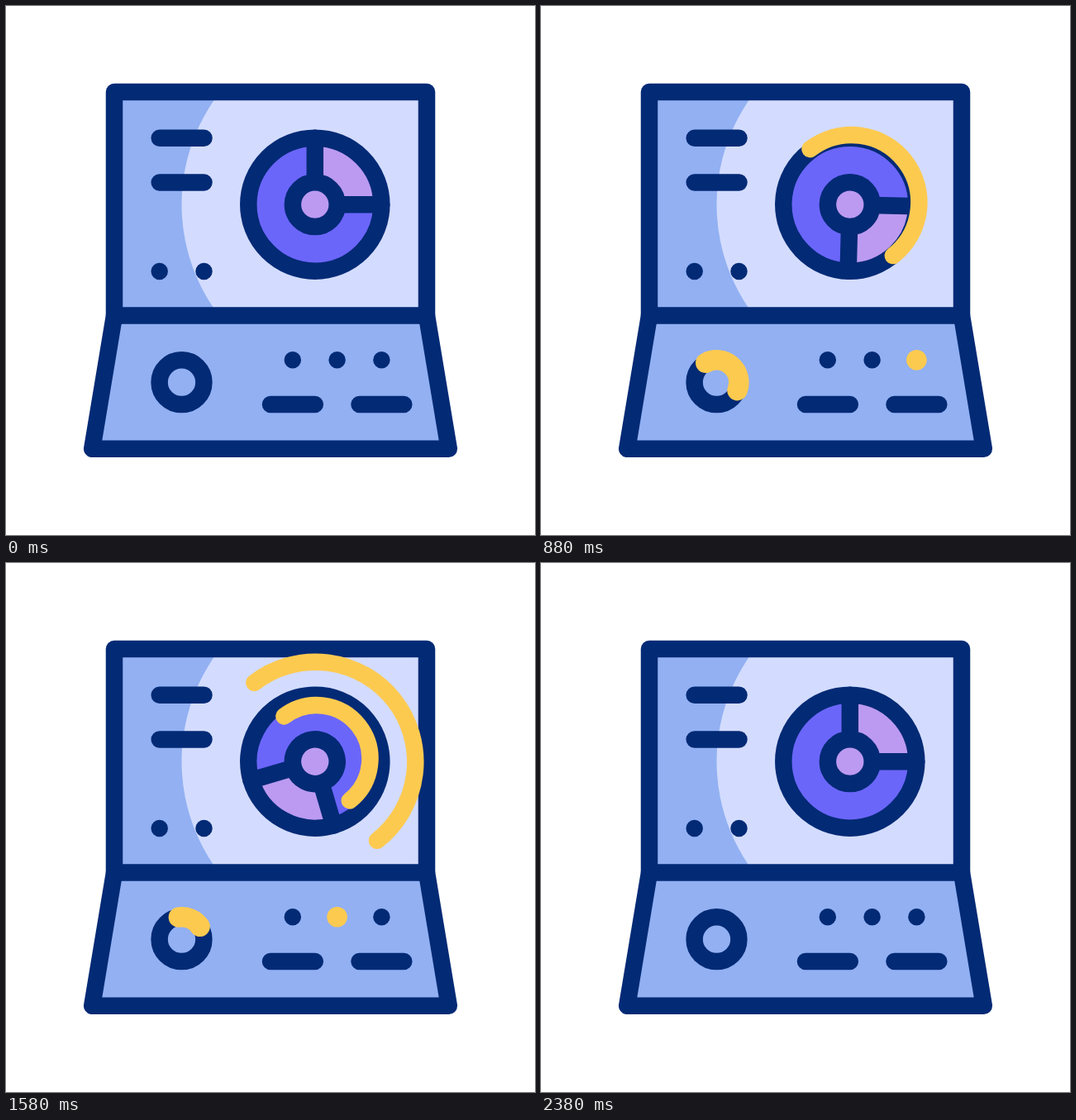
Animation, 640 px wide and 640 px high, one loop 2.4 s. Source, as an HTML page:

```html
<!DOCTYPE html>
<html lang="en">
<head>
<meta charset="utf-8">
<title>Scanner console</title>
<style>
  html, body { margin: 0; width: 100%; height: 100%; overflow: hidden; background: #fff; }
  svg { display: block; width: 100%; height: 100%; }
  .ink { stroke: #032a75; stroke-width: 20.5; stroke-linecap: round; stroke-linejoin: round; fill: none; }
  .glow { stroke: #fdca50; stroke-linecap: round; fill: none; }
</style>
</head>
<body>
<svg viewBox="0 0 640 640">
  <defs>
    <clipPath id="screen"><rect x="131" y="104" width="378" height="270.6"/></clipPath>
  </defs>

  <rect x="131" y="104" width="378" height="270.6" fill="#92b0f2"/>
  <circle cx="435.3" cy="240" r="222.8" fill="#d3dcfe" clip-path="url(#screen)"/>
  <path d="M131 374.6H509L535.8 535.8H104.2Z" fill="#92b0f2"/>

  <g class="ink">
    <rect x="131" y="104" width="378" height="270.6"/>
    <path d="M131 374.6L104.2 535.8H535.8L509 374.6"/>
    <path d="M185.7 159.7h53.8M185.7 213.4h53.8M185.7 320.9h0M239.5 320.9h0"/>
    <path d="M346.8 428.3h0M400.6 428.3h0M454.4 428.3h0M320 482.1h53.8M427.5 482.1h53.8"/>
    <circle cx="212.5" cy="455.2" r="26.9"/>
  </g>

  <g id="wheel">
    <circle r="80.5" fill="#6b66fa"/>
    <path d="M0 0V-80.5A80.5 80.5 0 0 1 80.5 0Z" fill="#bc9af1"/>
    <g class="ink">
      <path d="M0 -80.5V-26.9M26.9 0H80.5"/>
      <circle r="80.5"/>
      <circle r="26.9" style="fill:#bc9af1"/>
    </g>
  </g>

  <path id="knob" class="glow" stroke-width="24.5"/>
  <g id="lamps" fill="#fdca50">
    <circle cx="346.8" cy="428.3"/>
    <circle cx="400.6" cy="428.3"/>
    <circle cx="454.4" cy="428.3"/>
  </g>
  <g id="pulses" class="glow" stroke-width="20.5"><path/><path/><path/></g>
</svg>

<script>
const LOOP = 2400;
const wheel = document.getElementById('wheel');
const knob = document.getElementById('knob');
const lamps = [...document.getElementById('lamps').children];
const waves = [...document.getElementById('pulses').children];

// [time, degrees clockwise]
const TURN = [[0, 0], [500, 125.4], [880, 91.6], [1160, 76.6], [1200, 76.6],
  [1580, 163.6], [1800, 178], [2040, 159.3], [2360, 0]];
const HEAD = [[0, 90], [500, 255], [880, 471], [1180, 636.5], [1580, 775], [1800, 810]];
const TAIL = [[120, 90], [500, 159], [880, 330], [1180, 500], [1580, 712], [2020, 810]];

// [start, duration]
const WAVES = [[490, 845], [983, 797], [1295, 833]];

const clamp = x => Math.max(0, Math.min(1, x));

// Smooth curve through keys that never overshoots them
function track(keys, t) {
  const last = keys.length - 1;
  if (t <= keys[0][0]) return keys[0][1];
  if (t >= keys[last][0]) return keys[last][1];
  const rate = i => (keys[i + 1][1] - keys[i][1]) / (keys[i + 1][0] - keys[i][0]);
  const slope = i => {
    if (i === 0 || i === last) return 0;
    const a = rate(i - 1), b = rate(i);
    return a * b <= 0 ? 0 : 2 * a * b / (a + b);
  };
  let i = 0;
  while (t >= keys[i + 1][0]) i++;
  const [t0, a] = keys[i], [t1, b] = keys[i + 1];
  const d = t1 - t0, u = (t - t0) / d, v = 1 - u;
  return a * v * v * (1 + 2 * u) + b * u * u * (3 - 2 * u)
    + d * u * v * (slope(i) * v - slope(i + 1) * u);
}

// Clockwise arc, angles measured from twelve o'clock
function arc(x, y, r, from, to) {
  const point = deg => {
    const a = deg * Math.PI / 180;
    return (x + r * Math.sin(a)).toFixed(2) + ' ' + (y - r * Math.cos(a)).toFixed(2);
  };
  return `M${point(from)}A${r} ${r} 0 ${to - from > 180 ? 1 : 0} 1 ${point(to)}`;
}

function drawWave(el, [start, span], t) {
  const u = (t - start) / span;
  const on = u > 0 && u < 1;
  el.style.display = on ? '' : 'none';
  if (!on) return;
  const r = 13 + 140 * (1.112 * u - 0.112 * u * u);
  el.setAttribute('d', arc(377.7 - 0.025 * r, 232 + 0.069 * r, r, -37.9, 142.1));
  el.setAttribute('opacity', clamp((t - start) / 100) * clamp((1 - u) / 0.14));
}

function drawLamp(el, i, t) {
  const first = 500 + 190 * i;
  const gap = Math.min(Math.abs(t - first), Math.abs(t - first - 890));
  const lit = clamp((115 - gap) / 45);
  el.setAttribute('r', 10.2 + 2.1 * lit);
  el.setAttribute('opacity', lit);
}

function render(t) {
  wheel.setAttribute('transform', `translate(373.8 240.2) rotate(${track(TURN, t)})`);

  const head = track(HEAD, t), tail = track(TAIL, t);
  knob.style.display = head - tail > 0.5 ? '' : 'none';
  knob.setAttribute('d', arc(212.5, 455.2, 26.9, tail, head));

  lamps.forEach((el, i) => drawLamp(el, i, t));
  waves.forEach((el, i) => drawWave(el, WAVES[i], t));
}

const began = performance.now();
function tick(now) {
  render(Math.max(0, now - began) % LOOP);
  requestAnimationFrame(tick);
}
render(0);
requestAnimationFrame(tick);
</script>
</body>
</html>
```
